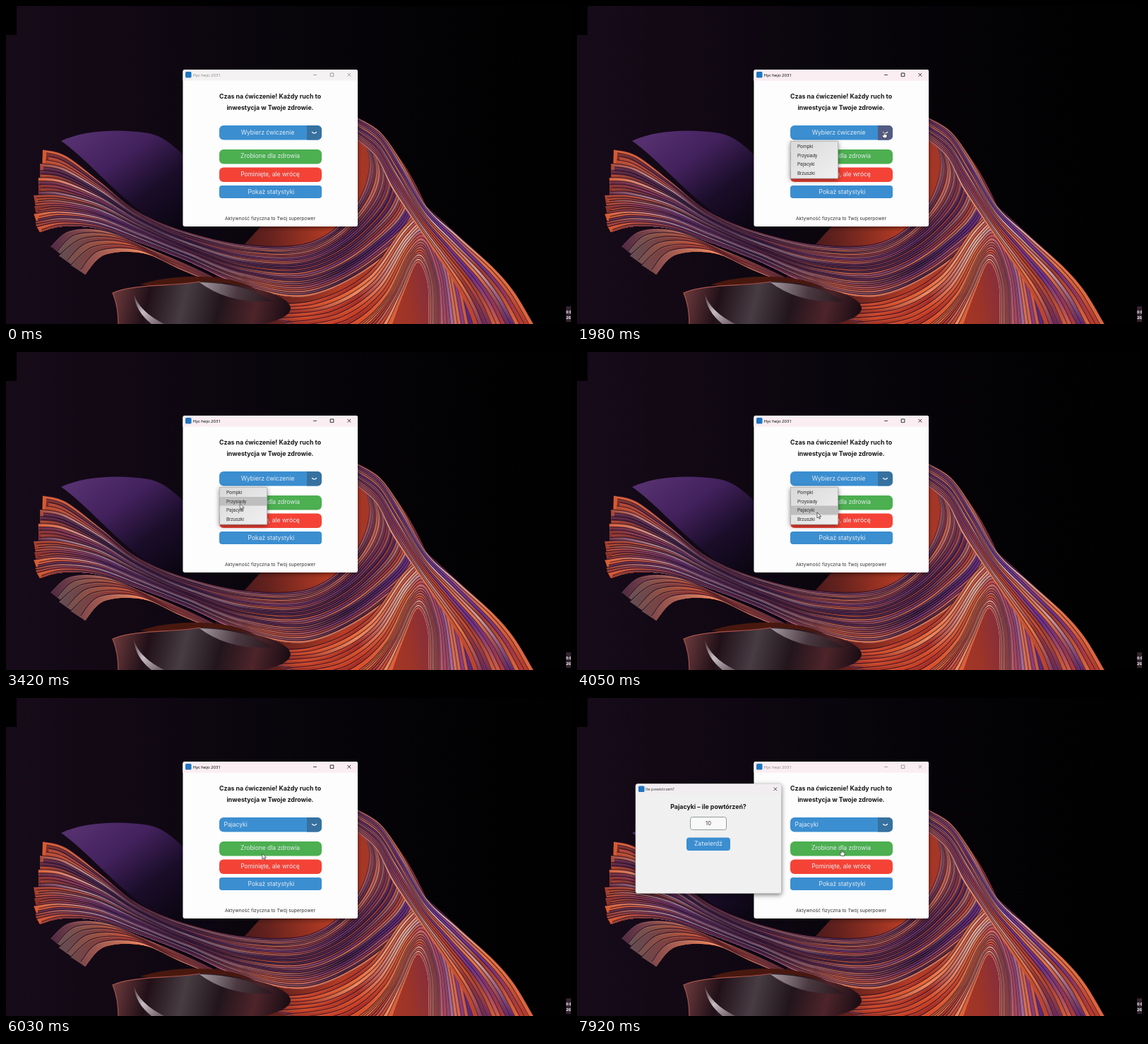
An HTML page with a canvas that plays this animation: 800x450 px, repeating every 8 s.

```html
<!DOCTYPE html>
<html lang="pl">
<head>
<meta charset="utf-8">
<title>Czas na ćwiczenie</title>
<style>
html, body { margin: 0; width: 100%; height: 100%; overflow: hidden; background: #050306; }
canvas, svg { position: absolute; left: 0; top: 0; width: 800px; height: 450px; }
text { font-family: Inter, "Open Sans", sans-serif; }
.mid { text-anchor: middle; }
.head { font-size: 8.8px; font-weight: 700; fill: #161616; }
.label { font-size: 8.5px; fill: #e4ecf4; }
.small { font-size: 6.7px; fill: #333; }
.item { font: 6.6px Roboto, sans-serif; fill: #333; }
.bar { font: 6px "Open Sans", sans-serif; }
.clock { font: bold 5.5px "Open Sans", sans-serif; fill: #fff; }
.sign { fill: none; stroke-width: .8; }

.step { opacity: 0; animation: 8s step-end infinite; }
.tint { animation-name: tint; }
.active { animation-name: active; }
.press { animation-name: press; }
.menu { animation-name: menu; }
.row1 { animation-name: row1; }
.row2 { animation-name: row2; }
.row3 { animation-name: row3; }
.before { animation-name: before; }
.after { animation-name: after; }
.green { animation-name: green; }
.dialog { animation-name: dialog; }
.arrow { animation-name: arrow; }
.hand { animation-name: hand; }
.cursor { animation: move 8s ease-in-out infinite; }

@keyframes tint { 0% { opacity: 0 } 22.5%, 100% { opacity: 1 } }
@keyframes active { 0%, 90% { opacity: 0 } 22.5% { opacity: 1 } 100% { opacity: 0 } }
@keyframes press { 0%, 27% { opacity: 0 } 19.5% { opacity: 1 } 100% { opacity: 0 } }
@keyframes menu { 0%, 56% { opacity: 0 } 23% { opacity: 1 } 100% { opacity: 0 } }
@keyframes row1 { 0%, 38% { opacity: 0 } 31% { opacity: 1 } 100% { opacity: 0 } }
@keyframes row2 { 0%, 44% { opacity: 0 } 38% { opacity: 1 } 100% { opacity: 0 } }
@keyframes row3 { 0% { opacity: 0 } 44%, 100% { opacity: 1 } }
@keyframes before { 0% { opacity: 1 } 56%, 100% { opacity: 0 } }
@keyframes after { 0% { opacity: 0 } 56%, 100% { opacity: 1 } }
@keyframes green { 0%, 92% { opacity: 0 } 79% { opacity: 1 } 100% { opacity: 0 } }
@keyframes dialog { 0% { opacity: 0 } 92.5%, 100% { opacity: 1 } }
@keyframes arrow { 0%, 28% { opacity: 1 } 19.5%, 79%, 100% { opacity: 0 } }
@keyframes hand { 0%, 28% { opacity: 0 } 19.5%, 79%, 100% { opacity: 1 } }
@keyframes move {
  0%, 11% { transform: translate(804px, 440px) }
  20%, 27% { transform: translate(435px, 178px) }
  33%, 36% { transform: translate(323px, 203px) }
  42% { transform: translate(331px, 214px) }
  47%, 57% { transform: translate(340px, 227px) }
  62%, 72% { transform: translate(354px, 224px) }
  79.5%, 100% { transform: translate(375px, 214.5px) }
}
</style>
</head>
<body>
<canvas id="wall" width="800" height="450"></canvas>
<svg viewBox="0 0 800 450">
  <defs>
    <filter id="shadow" x="-20%" y="-20%" width="140%" height="140%">
      <feDropShadow dx="0" dy="2" stdDeviation="3" flood-opacity=".5"/>
    </filter>
    <linearGradient id="menuFill" x2="1" y2="1">
      <stop stop-color="#d9d9d9"/><stop offset="1" stop-color="#f0f0f0"/>
    </linearGradient>
  </defs>

  <rect x="793" y="425" width="7" height="22" fill="#35232f"/>
  <text class="clock" x="793" y="435">0:0</text>
  <text class="clock" x="793" y="443">202</text>

  <rect x="250.5" y="90" width="247.5" height="222" rx="3" fill="#fdfdfd" filter="url(#shadow)"/>
  <path d="M250.500 105.500V93a3 3 0 0 1 3-3h241.500a3 3 0 0 1 3 3v12.500z" fill="#f4f2f3"/>
  <path class="step tint" d="M250.500 105.500V93a3 3 0 0 1 3-3h241.500a3 3 0 0 1 3 3v12.500z" fill="#fbeef3"/>
  <rect x="254" y="93" width="8.500" height="8.500" rx="1.500" fill="#1f75c0"/>
  <g fill="#858585" stroke="#8b8b8b">
    <text class="bar" x="264.500" y="99.700" stroke="none">Hyc hejo 2031</text>
    <path class="sign" d="M435 97.500h5M459.200 95h4.600v4.600h-4.600zM483.500 95l4.600 4.600m0-4.600l-4.600 4.600"/>
  </g>
  <g class="step active" fill="#333" stroke="#333">
    <text class="bar" x="264.500" y="99.700" stroke="none">Hyc hejo 2031</text>
    <path class="sign" d="M435 97.500h5M459.200 95h4.600v4.600h-4.600zM483.500 95l4.600 4.600m0-4.600l-4.600 4.600"/>
  </g>

  <text class="head mid" x="374" y="131">Czas na ćwiczenie! Każdy ruch to</text>
  <text class="head mid" x="374" y="147">inwestycja w Twoje zdrowie.</text>

  <rect x="302" y="169" width="145" height="20.500" rx="6" fill="#3b8ed0"/>
  <path id="drop" d="M426 169h15a6 6 0 0 1 6 6v8.500a6 6 0 0 1-6 6h-15z" fill="#36719f"/>
  <path class="step press" d="M426 169h15a6 6 0 0 1 6 6v8.500a6 6 0 0 1-6 6h-15z" fill="#545b82"/>
  <path d="M433.500 178.500q3 3.200 6 0" fill="none" stroke="#f2f5f8" stroke-width="1.300" stroke-linecap="round"/>
  <text class="label mid step before" x="370.500" y="181.500">Wybierz ćwiczenie</text>
  <text class="label step after" x="308.500" y="181.500">Pajacyki</text>

  <rect x="302" y="203" width="145" height="20.500" rx="6" fill="#4caf50"/>
  <rect class="step green" x="302" y="203" width="145" height="20.500" rx="6" fill="#419946"/>
  <text class="label mid" x="374" y="215.300">Zrobione dla zdrowia</text>
  <rect x="302" y="228.500" width="145" height="20.500" rx="6" fill="#f44336"/>
  <text class="label mid" x="374" y="240.800">Pominięte, ale wrócę</text>
  <rect x="302" y="254" width="145" height="18" rx="4" fill="#3b8ed0"/>
  <text class="label mid" x="375.500" y="265.500">Pokaż statystyki</text>
  <text class="small mid" x="374" y="303.200">Aktywność fizyczna to Twój superpower</text>

  <g class="step menu">
    <rect x="302.500" y="191.500" width="67" height="52.500" fill="url(#menuFill)" stroke="#a9a9a9" stroke-width=".7" filter="url(#shadow)"/>
    <g fill="#bebebe">
      <rect class="step row1" x="303" y="192" width="66" height="12.500"/>
      <rect class="step row2" x="303" y="205" width="66" height="12.500"/>
      <rect class="step row3" x="303" y="217.500" width="66" height="13"/>
    </g>
    <text class="item" x="312" y="200.500">Pompki</text>
    <text class="item" x="312" y="213.500">Przysiady</text>
    <text class="item" x="312" y="226.200">Pajacyki</text>
    <text class="item" x="312" y="239.200">Brzuszki</text>
  </g>

  <g class="step dialog">
    <rect x="83" y="121.500" width="206.500" height="155" rx="3" fill="#f0f0f0" stroke="#aaa" stroke-width=".6" filter="url(#shadow)"/>
    <path d="M83.300 136V124.500a3 3 0 0 1 3-3h200a3 3 0 0 1 3 3V136z" fill="#f1edf0"/>
    <rect x="87" y="124.500" width="8.500" height="8.500" rx="1.500" fill="#1f75c0"/>
    <text class="bar" x="97" y="131" fill="#333">Ile powtórzeń?</text>
    <path class="sign" d="M278.500 126.500l4.600 4.600m0-4.600l-4.600 4.600" stroke="#333"/>
    <text class="head mid" x="186" y="157">Pajacyki – ile powtórzeń?</text>
    <rect x="160.500" y="168.500" width="51" height="18" rx="3" fill="#f9f9fa" stroke="#929a9e"/>
    <text class="mid" x="186" y="179.800" font-size="7.500" fill="#333">10</text>
    <rect x="155" y="197.500" width="62" height="18.500" rx="4" fill="#3b8ed0"/>
    <text class="label mid" x="186" y="209.300">Zatwierdź</text>
  </g>

  <g class="cursor" fill="#fff" stroke="#222" stroke-width=".7" stroke-linejoin="round">
    <path class="step arrow" d="M0 0v8l1.900-1.700 1.300 2.900 1.300-.6-1.300-2.800h2.500z"/>
    <path class="step hand" d="M-.8 5V.8q.8-1.200 1.600 0v2.600l2.600.7q.9.300.7 1.400l-.6 3.300h-4.200l-2.400-3.200q0-1 1-.8z"/>
  </g>
</svg>
<script>
const ctx = document.getElementById('wall').getContext('2d');

let seed = 17;
const random = () => (seed = (seed * 16807) % 2147483647) / 2147483647;

function gradient(x0, y0, x1, y1, colors) {
  const g = ctx.createLinearGradient(x0, y0, x1, y1);
  colors.forEach((c, i) => g.addColorStop(i / (colors.length - 1), c));
  return g;
}

function shape(d, fill) {
  ctx.fillStyle = fill;
  ctx.fill(new Path2D(d));
}

// Catmull-Rom spline as cubic segments
function trace(path, pts) {
  for (let i = 0; i < pts.length - 1; i++) {
    const [a, b, c, d] = [pts[i - 1] || pts[i], pts[i], pts[i + 1], pts[i + 2] || pts[i + 1]];
    path.bezierCurveTo(b[0] + (c[0] - a[0]) / 6, b[1] + (c[1] - a[1]) / 6,
      c[0] - (d[0] - b[0]) / 6, c[1] - (d[1] - b[1]) / 6, ...c);
  }
}

function between(guides, t) {
  const pos = t * (guides.length - 1);
  const i = Math.min(Math.floor(pos), guides.length - 2), f = pos - i;
  return guides[i].map((p, k) => p.map((v, j) => v + (guides[i + 1][k][j] - v) * f));
}

// Overlapping strips blended from guide to guide; each palette colours one stretch of the length
function ribbons(guides, count, palettes, [x0, y0, x1, y1], jitter = 0) {
  const last = [...guides[guides.length - 1]].reverse();
  for (let k = 0; k < count; k++) {
    const pts = between(guides, k / count);
    pts[0][0] += (random() - .5) * jitter;
    const fill = new Path2D(), edge = new Path2D();
    for (const path of [fill, edge]) {
      path.moveTo(...pts[0]);
      trace(path, pts);
    }
    fill.lineTo(...last[0]);
    trace(fill, last);
    fill.closePath();
    ctx.fillStyle = gradient(x0, y0, x1, y1, palettes.map(p => p[Math.floor(random() * p.length)]));
    ctx.fill(fill);
    ctx.strokeStyle = 'rgba(25,5,32,.6)';
    ctx.lineWidth = 1.4;
    ctx.stroke(edge);
    ctx.save();
    ctx.translate(0, 1.3);
    ctx.strokeStyle = 'rgba(255,190,165,.3)';
    ctx.lineWidth = .7;
    ctx.stroke(edge);
    ctx.restore();
  }
}

const ember = ['#b74627', '#d9592c', '#e7703c', '#8c3125', '#5f2741', '#a33d2c'];
const violet = ['#2a173e', '#4c2267', '#9c4051', '#d3bacb', '#6b3185', '#c45d4b', '#35204e'];
const dusk = ['#481f49', '#832e32', '#b9482f', '#cf6b4b', '#5c2d73', '#a85c67', '#2d173a'];
const flame = ['#d94f2a', '#e86834', '#c83e25', '#f08a5e', '#a92f24'];
const ridge = ['#c94c2c', '#e87340', '#6b2f8d', '#d79b95', '#9c372d', '#4b2570'];

ctx.fillStyle = gradient(0, 0, 800, 0, ['#170b19', '#100813', '#08050b', '#030204', '#010101']);
ctx.fillRect(0, 0, 800, 450);
ctx.fillStyle = '#000';
ctx.fillRect(0, 0, 15, 41);

shape('M78 191C108 176 160 173 202 180C228 185 248 208 268 228L310 345C200 330 135 230 78 191Z',
  gradient(120, 170, 230, 320, ['#55306f', '#42215c', '#1a0d29', '#0b0612']));
shape('M290 390L498 160Q548 180 595 283L690 370L747 450H340Z',
  gradient(290, 400, 650, 340, ['#240d18', '#64221e', '#b83c24', '#9c3428', '#5c2462']));

ribbons([
  [[58, 203], [85, 212], [135, 250], [185, 290], [250, 318], [340, 338], [430, 335], [490, 290], [515, 225], [495, 160]],
  [[42, 270], [75, 270], [130, 283], [190, 312], [255, 340], [340, 368], [430, 370], [510, 325], [555, 255], [500, 160]],
  [[48, 320], [80, 312], [130, 315], [190, 335], [255, 360], [335, 395], [430, 410], [530, 360], [590, 285], [505, 165]]
], 27, [ember, violet, violet, dusk, dusk, ridge], [40, 0, 590, 0], 12);

ribbons([
  [[62, 340], [90, 318], [140, 318], [200, 342], [270, 372], [350, 410], [430, 430], [500, 420]],
  [[112, 380], [140, 352], [195, 350], [250, 374], [310, 400], [360, 432], [420, 455], [480, 460]]
], 6, [['#4a2741', '#d95a2c', '#5a5158'], flame, dusk, ['#511c22', '#79291f']], [60, 0, 480, 0], 8);

ribbons([
  [[330, 420], [430, 418], [510, 380], [565, 310], [600, 290], [635, 350], [660, 450]],
  [[450, 470], [500, 450], [540, 410], [570, 350], [592, 335], [612, 390], [615, 460]],
  [[540, 470], [550, 440], [565, 400], [580, 365], [590, 370], [598, 400], [598, 460]]
], 18, [['#5b1d23', '#7a2820'], ['#a83424', '#c84427'], flame, ['#e57845', '#f0b49c', '#d95630'], ['#4b2085', '#7a3399', '#c94b30']],
  [340, 430, 650, 370]);

ribbons([
  [[498, 158], [530, 178], [560, 220], [595, 283], [640, 325], [690, 370], [720, 405], [748, 452]],
  [[498, 190], [525, 215], [548, 260], [585, 315], [615, 360], [640, 400], [655, 430], [665, 460]]
], 13, [['#4c2161', '#803352', '#bd6959'], ridge, ['#e07348', '#dfc2c5', '#6930a0', '#cf4b2c'], ridge, ['#b83b2c', '#59246a', '#df6339']],
  [500, 160, 720, 450]);

// Glossy bowl
shape('M190 394C230 381 290 378 335 392L400 420L330 415Z', '#48180f');
shape('M151 406C180 393 235 397 275 390C320 390 403 405 403 428C402 440 380 446 365 450H159Q159 425 151 406Z',
  gradient(155, 390, 400, 450, ['#6d3b3d', '#211018', '#483c43', '#22151c', '#4d242a', '#160b12']));
shape('M181 407Q188 432 224 450H206Q183 432 181 407Z', gradient(180, 405, 220, 450, ['#3a2a32', '#c5bcc2', '#6e5b63']));
shape('M274 391Q340 392 378 418Q315 422 274 391Z', gradient(274, 390, 380, 420, ['#a79ba3', '#4a3940', '#27141b']));
ctx.strokeStyle = '#a8524b';
ctx.lineWidth = 1.2;
ctx.stroke(new Path2D('M159 450Q159 425 151 406C180 393 235 397 275 390'));
</script>
</body>
</html>
```
